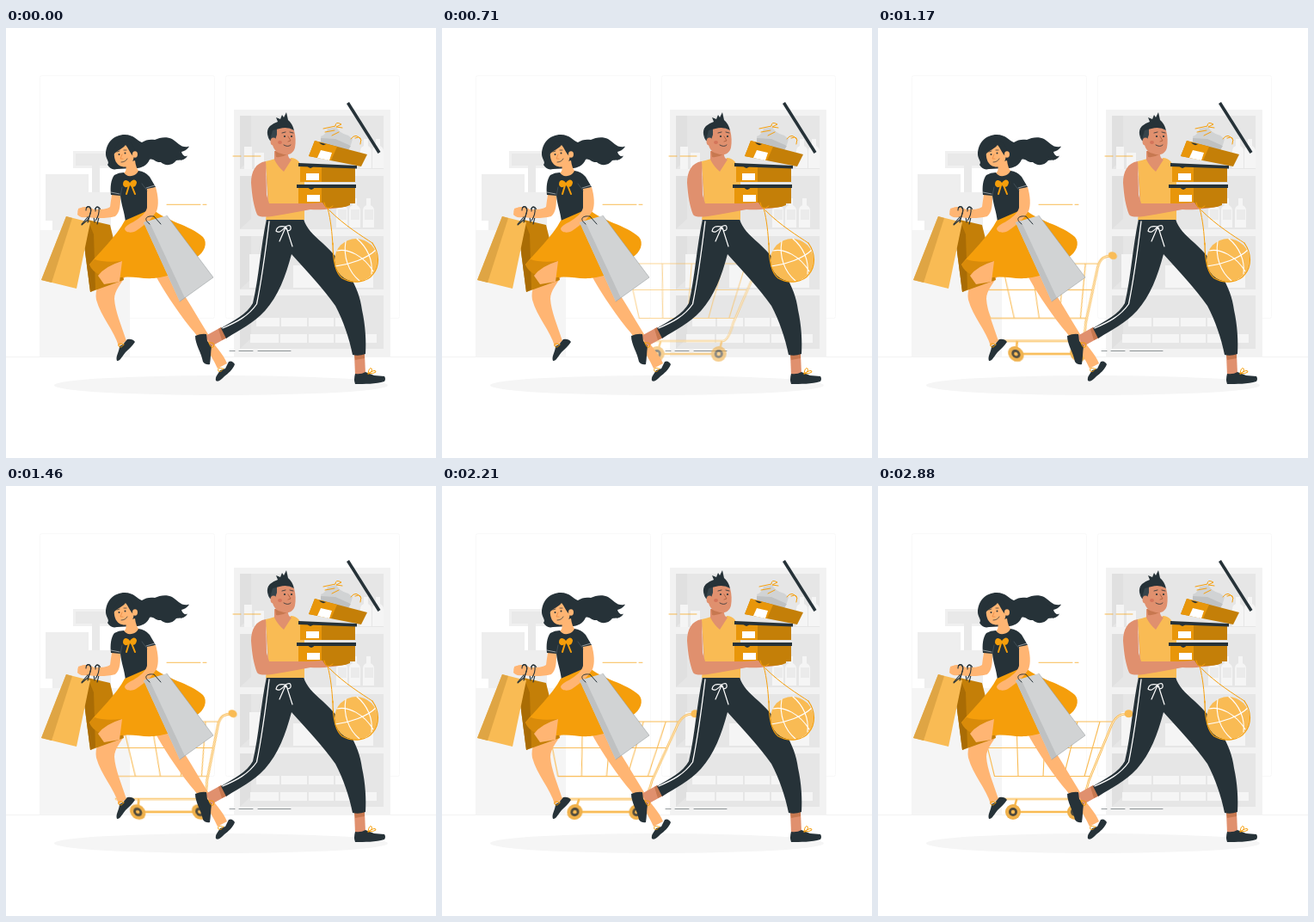
Animation of 500x500 px, one loop 2930 ms. Source, as an HTML page:

```html
<!DOCTYPE html>
<html lang="en">
<head>
<meta charset="utf-8">
<title>Shopping rush</title>
<style>
  html, body { margin: 0; width: 100%; height: 100%; overflow: hidden; background: #fff; }
  svg { display: block; width: 100vw; height: 100vh; }
  .line { fill: none; stroke-linecap: round; stroke-linejoin: round; }
  .dark { fill: #263238; }
  .amber { fill: #f59e0b; }
  .light { fill: #f9bb54; }
  .deep { fill: #c47f08; }
  .front { fill: #e8960a; }
  .skin { fill: #ffb573; }
  .tan { fill: #e0906e; }
  .pale { fill: #f5f5f5; }
  .grey { fill: #ebebeb; }
  .ink { stroke: #263238; }
  .gold { stroke: #f59e0b; }
  .white { stroke: #fff; }

  #cart {
    transform-origin: 208px 324px;
    animation: dash 2930ms infinite;
  }
  /* Fast skewed entry, overshoot, then a short wobble to rest. */
  @keyframes dash {
    0% { transform: translateX(250px) skewX(-20deg); opacity: 0; animation-timing-function: cubic-bezier(.5, 0, .8, .84); }
    31.4% { transform: translateX(22.5px) skewX(7.15deg); opacity: .9; animation-timing-function: cubic-bezier(.2, .46, .6, 1); }
    47.8% { transform: translateX(-16px) skewX(12deg); opacity: 1; animation-timing-function: cubic-bezier(.5, 0, .9, .7); }
    58% { transform: translateX(0) skewX(10deg); animation-timing-function: cubic-bezier(.3, .2, .5, 1); }
    74.1% { transform: translateX(0) skewX(-2.75deg); animation-timing-function: ease-in-out; }
    79.5% { transform: translateX(0) skewX(-2deg); animation-timing-function: ease-in-out; }
    92.2% { transform: translateX(0) skewX(.13deg); animation-timing-function: ease-in-out; }
    96.7%, 100% { transform: translateX(0) skewX(0deg); opacity: 1; }
  }
</style>
</head>
<body>
<svg viewBox="0 0 500 500">
  <defs>
    <g id="bay">
      <path fill="#e6e6e6" d="M272 0H439V62H272Z"/>
      <path fill="#e0e0e0" d="M272 0H285V50L272 62Z"/>
    </g>
    <path id="bottle" class="pale" d="M0 35V15Q0 11 4 9V1H9V9Q13 11 13 15V35Z"/>
    <g id="wheel">
      <circle r="9" fill="#efb04a"/>
      <circle r="5" fill="#4f4a3c"/>
      <circle r="2.200" fill="#f9bb54"/>
    </g>
  </defs>

  <!-- Room -->
  <g fill="#fff" stroke="#f8f8f8">
    <rect x="39.500" y="55.500" width="203" height="282" rx="2"/>
    <rect x="255.500" y="55.500" width="202" height="282" rx="2"/>
  </g>
  <path class="line" stroke="#ebebeb" stroke-width=".6" d="M0 382.500H500"/>

  <!-- Checkout -->
  <path class="pale" d="M39 235H144V382H39Z"/>
  <path fill="#eee" d="M46 170H96V224H46Z"/>
  <path fill="#f0f0f0" d="M78 143H121V163H78Z"/>
  <path fill="#e9e9e9" d="M81 146H121V160H81ZM100 160H109V192H100Z"/>
  <path fill="#eee" d="M72 191H122V235H54V222H72Z"/>

  <!-- Shelves -->
  <path fill="#f2f2f2" d="M265 95H447V382H265Z"/>
  <use href="#bay" y="102"/>
  <use href="#bay" y="172"/>
  <use href="#bay" y="242"/>
  <use href="#bay" y="311"/>
  <use href="#bottle" x="384" y="197"/>
  <use href="#bottle" x="399" y="197"/>
  <use href="#bottle" x="415" y="197"/>
  <use href="#bottle" x="412" y="128"/>
  <use href="#bottle" x="426" y="128"/>
  <path class="grey" d="M386 211H396V223H386ZM401 211H411V223H401ZM417 211H427V223H417Z"/>
  <path class="pale" d="M283 263H309V302H283ZM334 276H380V302H334ZM384 282H427V302H384ZM277 138H286V164H277ZM289 145H300V164H289Z"/>
  <g class="pale">
    <path d="M291 337H318V347H291ZM320 337H350V347H320ZM352 337H381V347H352ZM383 337H412V347H383Z"/>
    <path d="M284 356H317V366H284ZM319 356H350V366H319ZM352 356H381V366H352ZM383 356H409V366H383ZM411 356H431V366H411Z"/>
  </g>

  <ellipse class="pale" cx="250" cy="415.500" rx="194" ry="11.500"/>

  <!-- Speed lines -->
  <path class="line gold" stroke-width=".7" d="M264 149H273M277 149H296M187 205.300H226M229 205.300H233"/>
  <path class="line ink" stroke-width=".5" d="M260 375.500H266M271 375.500H287M293 375.500H331"/>

  <!-- Cart -->
  <g id="cart">
    <g class="line" stroke="#f9bb54">
      <path stroke-width="1.100" d="M120 274H272M128 304.500H261M135.500 337.500H248M120 274L135.500 337.500M161 274L163 337.500M195 274L192 337.500M232 274L216 337.500M258 274L240 337.500"/>
      <path stroke-width="2.600" d="M291 265C282 265 277 267 272 277L245 343Q240 364 233 364H135"/>
      <path stroke="#fff3dc" stroke-width=".9" d="M287 265C281 266 277 268 272 277L245 343Q240 364 233 364H135"/>
      <path stroke-width="2.600" d="M157 379H229M161 365L157 379M232 365L229 379"/>
    </g>
    <ellipse class="light" cx="291.500" cy="264.700" rx="5" ry="4.500"/>
    <use href="#wheel" x="157" y="379"/>
    <use href="#wheel" x="229" y="379"/>
  </g>

  <!-- Woman -->
  <g id="woman">
    <path class="skin" d="M174 288C182 303 196 325 214 348C226 362 238 378 246 396L257 390C252 378 245 373 238 361C222 335 208 310 191 286Z"/>
    <path class="dark" d="M244 410C243 405 247 402 249 398L255 396L259 388Q263 386 266 391C264 397 258 402 254 405C250 409 247 412 244 410Z"/>
    <path class="line gold" stroke-width=".9" d="M252 396Q245 394 247 399Q250 401 253 396"/>
    <path class="skin" d="M119 282C108 293 103 305 105 316C110 335 126 352 131 370L140 364C134 345 127 330 126 315C126 305 134 298 140 286Z"/>
    <path class="dark" d="M129 387C127 382 132 376 132 370L136 368L141 362Q147 361 150 365C147 370 142 374 139 377C135 382 132 388 129 387Z"/>
    <path class="line gold" stroke-width=".9" d="M137 368Q129 365 131 370Q134 373 137 368"/>

    <path class="deep" d="M95 223L121 229L137 293L98 307L90 245Z"/>
    <path fill="#a96c05" d="M95 223L90 245L98 307L104 304L102 240Z"/>
    <path class="line ink" stroke-width="1.100" d="M103 226C99 208 108 204 110 212L106 228"/>

    <path class="dark" d="M116 147C116 133 126 124 138 124C149 124 152 131 158 133C162 130 168 129 173 130C179 127 187 126 193 129C200 133 203 140 213 138C210 142 207 143 204 144C205 148 208 150 211 149C206 155 201 153 198 154C193 161 184 160 180 156C174 157 171 151 167 153C164 160 157 164 147 163L129 164Q122 166 118 159C121 156 116 152 116 147Z"/>
    <path class="line ink" stroke-width=".8" d="M196 138Q206 145 212 138M198 150Q205 157 210 149"/>
    <path class="skin" d="M139 157L150 154Q151 163 155 167Q150 174 145 174Q139 174 137 169Q141 166 139 157Z"/>
    <path class="skin" d="M126 143C129 138 135 134 141 133C148 137 150 145 148 153C145 162 138 163 132 160C127 157 125 150 126 143Z"/>
    <path class="dark" d="M125 147C125 137 132 130 141 131C148 133 151 142 150 151L146 147C143 143 142 139 139 136C135 141 131 141 125 147Z"/>
    <ellipse class="skin" cx="150" cy="147" rx="3" ry="3.700"/>
    <circle class="dark" cx="131.500" cy="147" r="1"/>
    <circle class="dark" cx="138.500" cy="145.500" r="1"/>
    <path class="line ink" stroke-width=".7" d="M129 144L132 143M137 142L140 142M134 156Q139 156 141 152"/>
    <path class="line" stroke="#e88b46" stroke-width=".8" d="M135 147L133 152L136 152"/>

    <path class="skin" d="M123 193L133 194C133 205 133 214 127 219C116 222 103 221 94 220C88 221 82 218 84 211C90 206 98 208 102 211C110 211 117 211 121 208Z"/>
    <path class="dark" d="M126 171Q131 168 137 168Q140 173 146 172Q152 171 154 166Q162 167 167 173L174 185L164 189L164 202L171 212L139 226C138 214 134 206 133 195L122 194C121 185 122 176 126 171Z"/>
    <path class="amber" d="M97 275C108 261 129 242 138 224L170 210C186 225 214 229 229 243C235 250 231 261 221 267C209 282 191 289 172 291C157 292 148 288 133 290C118 290 102 285 97 275Z"/>
    <path fill="#d98b0a" d="M97 275Q99 272 103 269Q114 273 135 271L109 287Q100 283 97 275Z"/>
    <path class="skin" d="M107 288Q115 277 135 271L132 295L114 298Z"/>
    <path class="skin" d="M164 187L174 185C177 195 178 206 175 213C169 223 160 230 151 236C146 239 138 238 138 233C141 228 148 226 152 223C158 219 163 214 164 209Z"/>
    <path class="line" stroke="#fff" stroke-width=".5" d="M122 191L132 193M163 186L173 183"/>
    <path class="line" stroke="#526069" stroke-width=".6" d="M164 189L158 181M133 195L135 185"/>
    <path class="amber" d="M144 180C140 175 136 177 136 182C137 186 141 186 144 183C148 187 152 184 152 179C150 175 147 176 144 180Z"/>
    <path class="line gold" stroke-width="2" d="M143 183L140 193M146 183L150 193"/>

    <path class="light" d="M70 219L98 226L82 303L41 293Z"/>
    <path fill="#dfa544" d="M70 219L41 293L53 296L77 221Z"/>
    <path class="line ink" stroke-width="1.100" d="M88 228L95 220C89 205 99 205 99 212L95 226"/>
    <path class="skin" d="M84 210Q92 206 98 212L96 219Q87 222 83 217Z"/>
    <path class="line ink" stroke-width="1.100" d="M93 212Q93 207 97 208Q101 212 95 223L88 229M104 213Q104 206 108 209Q109 217 104 224"/>

    <path fill="#d1d3d4" d="M160 226L187 218L241 290L202 318Z"/>
    <path fill="#bfc1c2" d="M160 226L202 318L208 314L166 224Z"/>
    <path class="line" stroke="#8f9597" stroke-width=".5" d="M187 218L241 290L202 318"/>
    <path class="line ink" stroke-width="1" d="M167 228C158 221 165 218 172 219L180 228"/>
  </g>

  <!-- Man -->
  <g id="man">
    <path class="tan" d="M232 358L250 348L257 360L239 370Z"/>
    <path fill="#c77850" d="M247 350L250 348L257 360L251 363Z"/>
    <path class="dark" d="M220 358Q227 355 233 356L234 364L239 370C238 377 238 385 237 391Q232 392 229 388C227 377 220 368 220 358Z"/>
    <path class="line gold" stroke-width="1" d="M236 366Q244 365 241 371Q238 373 236 366"/>
    <path class="tan" d="M405 379H417L418 402L406 404Z"/>
    <path fill="#c77850" d="M405 379H417V384L406 386Z"/>
    <path class="dark" d="M406 402Q413 403 418 400L428 404L440 405Q442 408 440 411C430 414 417 414 406 414Q404 409 406 402Z"/>
    <path class="line gold" stroke-width="1" d="M421 402Q422 394 425 396Q427 399 421 402Q430 396 430 400Q428 402 421 402"/>

    <path class="dark" d="M303 222H346C349 233 357 240 368 250C392 272 411 300 414 328C418 346 419 365 418 379Q410 382 403 380C399 360 392 340 383 323C369 303 350 283 332 263C325 289 317 311 301 329C287 344 273 350 256 361L250 349C265 340 280 333 287 320C294 291 296 255 303 222Z"/>
    <path class="line white" stroke-width="1.300" d="M306 225C302 258 297 294 291.500 321C282 335 268 342 252 349"/>
    <path class="line white" stroke-width="1.200" d="M325 231Q315 229 314 236Q318 240 325 231Q332 227 331 234Q328 238 325 232L318 248M326 232L333 254"/>

    <path class="tan" d="M302 157L330 153L342 180L349 203L342 211H305Z"/>
    <path class="light" d="M302 155Q307 154 313 152L323 166L331 151Q337 151 341 156L347 180L347 223H302L305 200Z"/>
    <path class="tan" d="M312 143L328 144Q327 151 332 153L323 167Q316 161 312 153Z"/>
    <path fill="#c77850" d="M313 143L327 147Q320 151 314 150Z"/>
    <path class="tan" d="M308 119Q321 111 335 119C337 126 337 133 336 139C334 147 327 149 320 146C312 145 308 137 308 119Z"/>
    <path fill="#37444b" d="M305 117Q308 112 315 113L315 124L312 133L307 131Q302 124 305 117Z"/>
    <path class="dark" d="M304 121Q304 113 316 109L314 104L319 106L321 101L323 104L326 98L328 107Q333 111 335 119Q327 114 318 117L310 119L307 130Z"/>
    <ellipse class="tan" cx="311" cy="132" rx="3.500" ry="4.500"/>
    <circle class="dark" cx="324" cy="126" r="1.100"/>
    <circle class="dark" cx="332" cy="126" r="1.100"/>
    <path class="line ink" stroke-width=".8" d="M321 122L325 121M330 121L334 122M323 136Q328 139 331 136"/>
    <path class="line" stroke="#a85c3c" stroke-width=".8" d="M328 126L331 131L328 132"/>
    <ellipse cx="318.500" cy="133" rx="2.500" ry="2" fill="#d4745a"/>

    <!-- Boxes -->
    <path class="dark" d="M396 88L399 86L435.500 144L432.500 146Z"/>
    <path fill="#d1d3d4" d="M367 133L366 126Q372 124 374 117L384 115Q387 122 398 125L403 129L401 136L390 141Z"/>
    <path fill="#bfc1c2" d="M366 128L383 129L401 137L398 142L366 133Z"/>
    <path class="line gold" stroke-width="1" d="M369 117L383 114Q383 108 390 112L384 115L391 116M371 121L382 119M379 125L387 121M401 129Q407 121 413 130M406 128Q415 124 412 135"/>
    <path class="deep" d="M359 131L420 147L413 161L352 149Z"/>
    <path class="front" d="M359 131L385 138L378 154L352 149Z"/>
    <path class="dark" d="M364 133L372 135Q368 138 364 133Z"/>
    <path fill="#fff" d="M366 142L379 145L376 154L362 151Z"/>

    <path class="deep" d="M342 160H406V179H342Z"/>
    <path class="front" d="M342 160H367V179H342Z"/>
    <path class="dark" d="M340 157L408 160V163.500L340 161Z"/>
    <path class="dark" d="M350 160H358Q354 166 350 160Z"/>
    <path fill="#fff" d="M349 169H364V177H349Z"/>
    <path class="deep" d="M340 185H406V204H340Z"/>
    <path class="front" d="M340 185H367V204H340Z"/>
    <path class="dark" d="M338 182H407V186H338Z"/>
    <path class="dark" d="M351 185H359Q355 191 351 185Z"/>
    <path fill="#fff" d="M350 194H365V202H350Z"/>

    <path class="tan" d="M302 155C290 157 285 167 285 180C286 195 288 207 292 217C294 220 301 220 309 219C326 216 340 214 354 211C367 212 385 210 397 207L399 203L367 203L352 204L306 204L303 194Z"/>
    <path class="deep" d="M368 203H400V206Q390 210 372 209Z"/>

    <!-- Ball in its net -->
    <path class="line gold" stroke-width="1" d="M370 203Q372 214 380 207M374 209C378 225 379 238 380 252M376 212C394 230 414 242 426 250"/>
    <circle class="light" cx="407" cy="270" r="25"/>
    <path class="line white" stroke-width="1.100" d="M395 248C392 266 398 283 411 294M383 277C400 275 420 268 430 258M385 259C398 256 416 265 427 283M408 245C420 255 427 270 425 286"/>
    <path class="line gold" stroke-width="1.200" d="M380 250C380 270 383 285 391 291C403 298 420 296 427 286C434 277 435 263 426 250"/>
  </g>
</svg>
</body>
</html>
```
